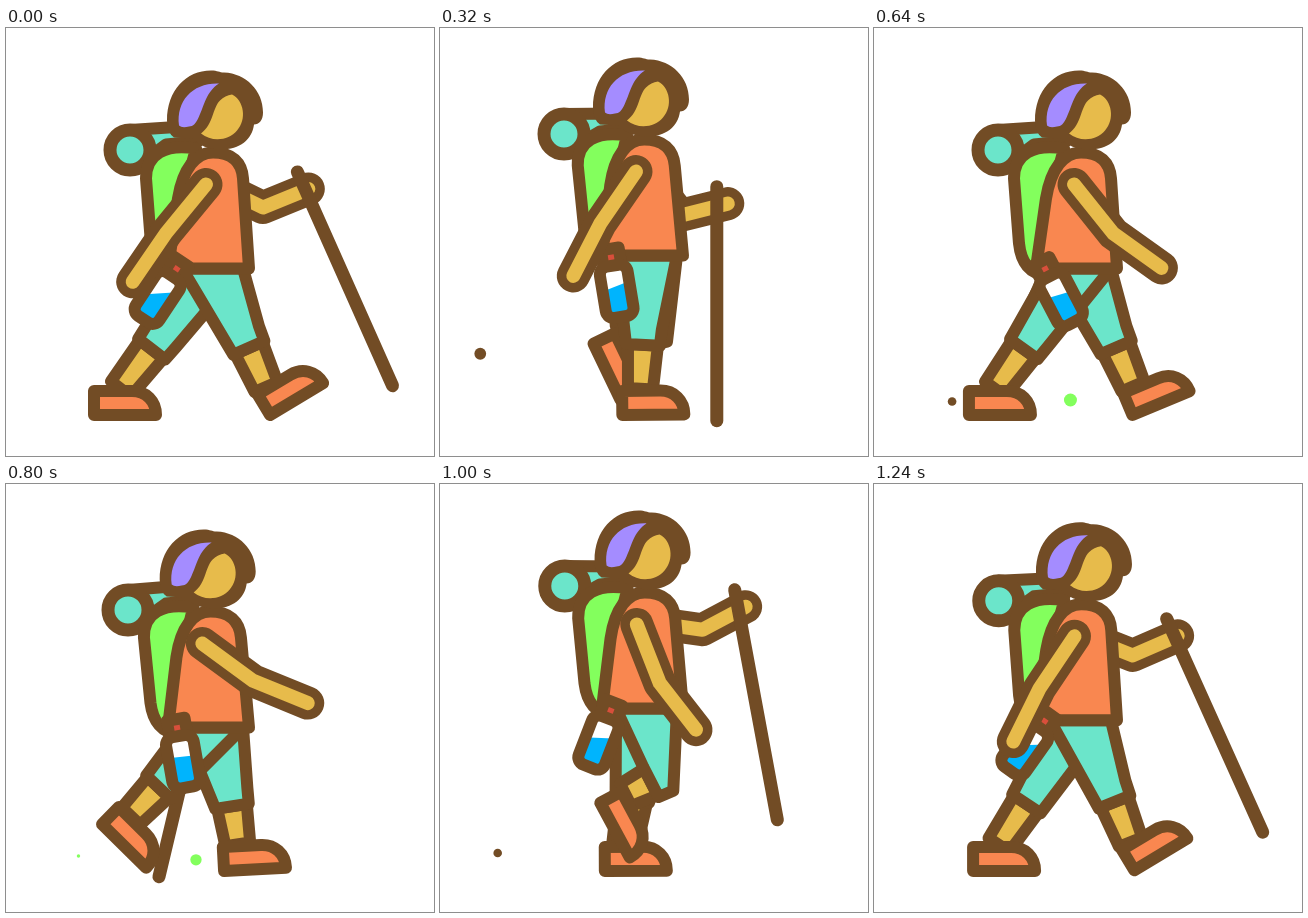
Write an HTML page with a canvas that moves like this. It is 428 px wide and 428 px high and loops after 1280 ms.

```html
<!DOCTYPE html>
<html lang="en">
<head>
<meta charset="utf-8">
<title>Hiker</title>
<style>
  html, body { margin: 0; height: 100%; overflow: hidden; background: #fff; }
  canvas { display: block; width: 100vw; height: 100vh; }
</style>
</head>
<body>
<canvas id="stage" width="428" height="428"></canvas>
<script>
const LOOP = 1280, PACE = LOOP / 2, STEP = 40;
const STANCE = 665, STRIDE = 176, FRONT_X = 264, GROUND_Y = 387;
const BROWN = '#724c25', SKIN = '#e7bb4b', ORANGE = '#f98750', TEAL = '#6be5ca',
      GREEN = '#83ff5d', PURPLE = '#a48cff', BLUE = '#00b4fd', RED = '#d84f3b';

const puffs = [
  { color: BROWN, birth: 100, life: 390, from: [84, 346], to: [30, 321], size: 6 },
  { color: BROWN, birth: 380, life: 320, from: [163, 387], to: [75, 373], size: 7.8 },
  { color: BROWN, birth: 880, life: 250, from: [100, 380], to: [42, 365], size: 4.3 },
  { color: GREEN, birth: 450, life: 500, from: [210, 364], to: [188, 377], size: 7 },
  { color: GREEN, birth: 640, life: 180, from: [110, 378], to: [72, 372], size: 5 }
];

const shapes = {
  foot: 'M0 0V-24H38C52-24 62-14 62 0Z',
  pack: 'M190 120C160 115 140 125 140 150L145 215C147 234 156 246 172 246L182 150Z',
  shirt: 'M162 240L172 170C177 140 190 124 207 124C226 124 236 134 237 150L243 240Z',
  head: 'M161 92C161 62 180 42 205 42C212 42 213 44 218 44C240 45 257 62 257 84C257 92 253 96 248 96' +
        'C246 111 234 121 215 121C203 121 193 117 186 110L168 109Q161 104 161 92Z',
  hair: 'M173 97C170 72 187 54 213 55C200 63 198 78 193 88C190 95 187 98 183 98Q176 100 173 97Z',
  face: 'M226 66C238 72 241 91 231 102C223 112 206 114 195 105C208 95 206 80 214 72Q219 67 226 66Z'
};
for (const name in shapes) shapes[name] = new Path2D(shapes[name]);

const ctx = document.getElementById('stage').getContext('2d');
const rad = deg => deg * Math.PI / 180;
const mix = (a, b, p) => a + (b - a) * p;
const wave = (time, lead = 0, period = LOOP) => Math.cos(2 * Math.PI * time / period + rad(lead));
const ramp = (value, from, to) => {
  const p = Math.min(1, Math.max(0, (value - from) / (to - from)));
  return p * p * (3 - 2 * p);
};
// Point at a distance from a joint; 0 degrees hangs down, 90 points forward.
const reach = ([x, y], deg, length) =>
  [x + length * Math.sin(rad(deg)), y + length * Math.cos(rad(deg))];

function line(points, closed) {
  const path = new Path2D();
  points.forEach(([x, y]) => path.lineTo(x, y));
  if (closed) path.closePath();
  return path;
}

function disc(x, y, r) {
  const path = new Path2D();
  path.arc(x, y, r, 0, 2 * Math.PI);
  return path;
}

function fill(path, color) {
  ctx.fillStyle = color;
  ctx.fill(path);
}

function stroke(path, color, width) {
  ctx.strokeStyle = color;
  ctx.lineWidth = width;
  ctx.stroke(path);
}

function paint(path, color, width = 12) {
  fill(path, color);
  stroke(path, BROWN, width);
}

function drawArm(...joints) {
  const path = line(joints);
  stroke(path, BROWN, 33);
  stroke(path, SKIN, 14);
}

function drawPuffs(time) {
  for (const { color, birth, life, from, to, size } of puffs) {
    const age = (time - birth) / life;
    if (age <= 0 || age >= 1) continue;
    const p = 1 - (1 - age) ** 2;
    fill(disc(mix(from[0], to[0], p), mix(from[1], to[1], p), size * Math.sin(Math.PI * age)), color);
  }
}

// The foot slides back along the ground, then lifts and swings forward.
function footPose(phase) {
  if (phase < STANCE) {
    return [FRONT_X - STRIDE * (phase / STANCE) ** 1.05, GROUND_Y, -31 * Math.exp(-phase / 80)];
  }
  const q = (phase - STANCE) / (LOOP - STANCE);
  const p = ramp(q ** 1.35, 0, 1);
  const lift = 235 * Math.sqrt(p) * (1 - p) ** 1.5;
  return [FRONT_X - STRIDE * (1 - p), GROUND_Y - lift, 65 * ramp(q, 0, 0.35) - 96 * ramp(q, 0.5, 0.9)];
}

function drawLeg(time, hipY) {
  const hipX = 208;
  const [x, y, deg] = footPose(time % LOOP);
  const cos = Math.cos(rad(deg)), sin = Math.sin(rad(deg));
  const inset = 11 + (FRONT_X - x) * 0.09 - Math.max(0, deg) * 0.25;
  const ankleX = x + inset * cos + 26 * sin, ankleY = y + inset * sin - 26 * cos;

  // The shorter the leg, the further the knee is pushed forward.
  const dx = ankleX - hipX, dy = ankleY - hipY, span = Math.hypot(dx, dy);
  const bend = 0.65 * Math.max(0, 122 - span) / span;
  const hemX = hipX + dx * 0.67 + bend * (dy + dx / 2);
  const hemY = hipY + dy * 0.67 + bend * (dy / 2 - dx);

  const shin = Math.hypot(ankleX - hemX, ankleY - hemY);
  const ux = (ankleX - hemX) / shin, uy = (ankleY - hemY) / shin;
  const at = (along, side) => [hemX + ux * along + uy * side, hemY + uy * along - ux * side];

  paint(line([at(0, -15), at(0, 15), at(shin, 12.5), at(shin, -12.5)], true), SKIN);
  ctx.save();
  ctx.translate(x, y);
  ctx.rotate(rad(deg));
  paint(shapes.foot, ORANGE);
  ctx.restore();
  paint(line([[176, hipY], [237, hipY], at(-16, 18), at(0, 17), at(0, -17)], true), TEAL);
}

function drawFarArm(time, rise) {
  const lift = wave(time, 79);
  const tuck = ramp(time, 320, 480) - ramp(time, 800, 1000);
  const behindBody = ([x, y]) => [mix(x, 218, tuck), mix(y, 182, tuck)];
  const shoulder = [203, 153 + rise];
  const elbow = reach(shoulder, 60 + 22 * lift, 60);
  const hand = behindBody(reach(elbow, 111 + 7 * lift, 49));
  const poleTop = [hand[0] - 11, hand[1] - 17];
  const sway = wave(time, -90);
  drawArm(shoulder, behindBody(elbow), hand);
  stroke(line([poleTop, reach(poleTop, 24 * wave(time) - 3 * sway * (1 - sway), 234)]), BROWN, 13);
}

function drawNearArm(time, lean, rise) {
  const back = wave(time, -40);
  const shoulder = [200 + lean / 2, 156 + rise];
  const elbow = reach(shoulder, 3 - 51 * back - 8 * (1 - back * back), 63);
  drawArm(shoulder, elbow, reach(elbow, 10 - 58 * back, 59));
}

function drawBottle(time, rise) {
  const tilt = 3 + 33 * wave(time, 22), slosh = -10 - 13 * wave(time, -120);
  const cap = new Path2D(), flask = new Path2D();
  cap.rect(-9, -8, 18, 18);
  flask.roundRect(-14, 9, 28, 52, 8);
  ctx.save();
  ctx.translate(171, 240 + rise * 0.9);
  ctx.rotate(rad(tilt));
  paint(cap, RED);
  fill(flask, '#fff');
  ctx.save();
  ctx.clip(flask);
  ctx.translate(0, 30);
  ctx.rotate(rad(slosh - tilt));
  ctx.fillStyle = BLUE;
  ctx.fillRect(-50, 0, 100, 60);
  ctx.restore();
  stroke(flask, BROWN, 12);
  ctx.restore();
}

function drawBody(time, lean, rise) {
  const rollX = 124 + 2 * wave(time, 90, PACE), rollY = 121.5 + rise / 4;
  ctx.save();
  ctx.translate(0, rise);
  paint(line([[rollX, rollY - 20], [178, 98], [192, 113], [160, 116], [rollX + 18, rollY + 8]], true), TEAL);
  paint(disc(rollX, rollY, 20), TEAL, 13);

  // The torso leans from the hips, half as far as the head.
  ctx.save();
  ctx.transform(1, 0, -lean / 320, 1, lean * 0.75, 0);
  paint(shapes.pack, GREEN);
  paint(shapes.shirt, ORANGE);
  ctx.restore();

  ctx.translate(lean, 0);
  fill(shapes.head, BROWN);
  fill(shapes.hair, PURPLE);
  fill(shapes.face, SKIN);
  ctx.restore();
}

function draw(time) {
  const rise = -6 + 11.5 * wave(time, -56, PACE);
  const lean = -4 + 5.2 * wave(time, 39.5, PACE);
  ctx.fillStyle = '#fff';
  ctx.fillRect(0, 0, 428, 428);
  ctx.lineCap = ctx.lineJoin = 'round';

  drawPuffs(time);
  drawFarArm(time, rise);
  drawLeg(time + STANCE, 240 + rise);
  drawLeg(time, 240 + rise);
  drawBody(time, lean, rise);
  drawBottle(time, rise);
  drawNearArm(time, lean, rise);
}

const start = performance.now();
function tick() {
  const elapsed = performance.now() - start;
  draw(Math.floor(elapsed / STEP) * STEP % LOOP);
  requestAnimationFrame(tick);
}
tick();
</script>
</body>
</html>
```
